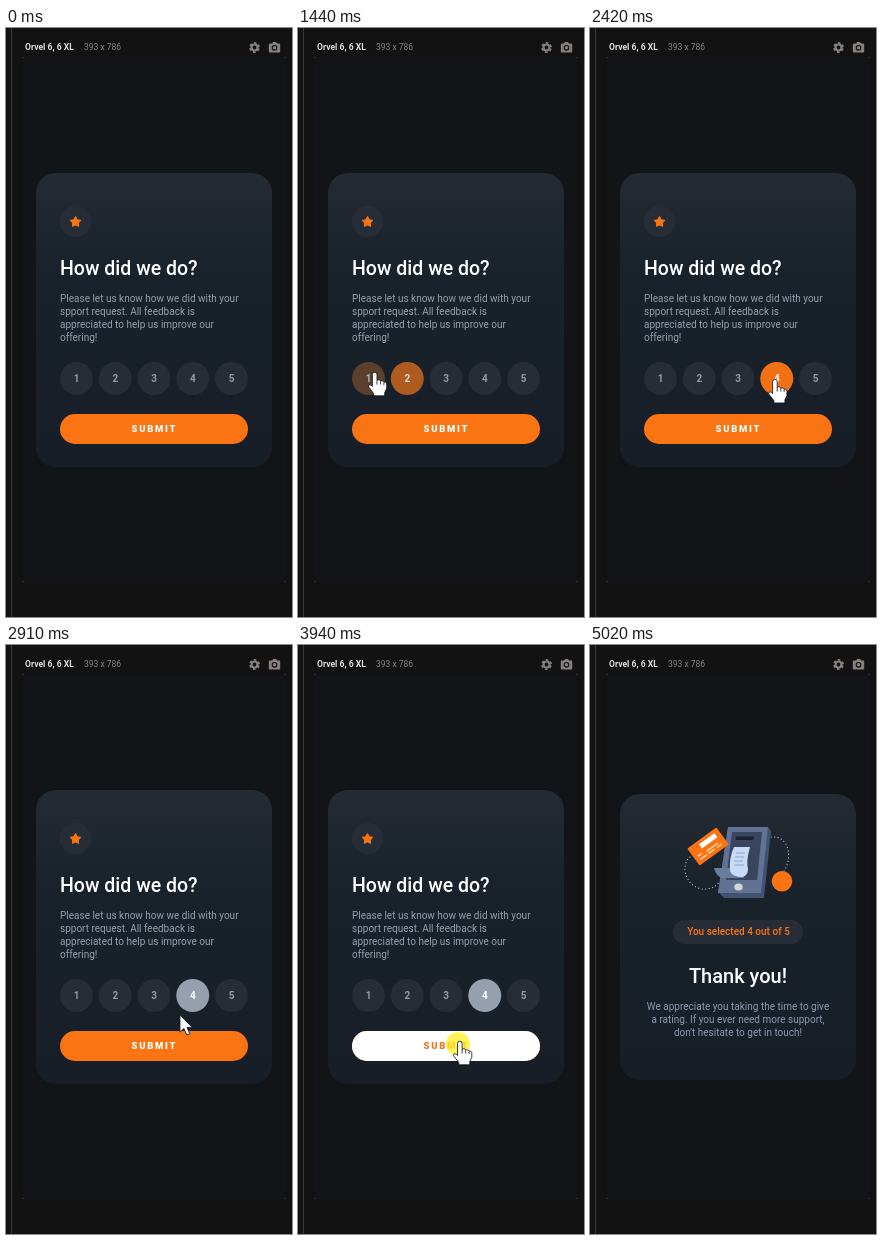
These frames come from a looping animation (286x589 px, 6080 ms). An HTML page:

```html
<!DOCTYPE html>
<html lang="en">
<head>
<meta charset="utf-8">
<title>Feedback form</title>
<style>
  html, body { margin: 0; width: 100%; height: 100%; overflow: hidden; background: #121212; }
  svg { display: block; width: 286px; height: 589px; font: 10px Roboto, sans-serif; }
  .title { font-weight: 500; fill: #fff; }
  .copy { fill: #969fad; }
  .mid { text-anchor: middle; }
  .submit { font-size: 9.5px; font-weight: 900; letter-spacing: 1.7px; }
  .num { font-weight: 700; }
  .dots { fill: none; stroke: #cfd6e2; stroke-width: 1.1; stroke-dasharray: .1 3.4; stroke-linecap: round; }
</style>
</head>
<body>
<svg viewBox="0 0 286 589">
  <defs>
    <linearGradient id="shade" x2="0" y2="1">
      <stop stop-color="#242b34"/>
      <stop offset=".35" stop-color="#19212b"/>
      <stop offset="1" stop-color="#171e28"/>
    </linearGradient>
  </defs>

  <!-- Preview frame -->
  <path d="M5.5 0V589" stroke="#383838"/>
  <rect x="17" y="30" width="262" height="524" fill="#121417"/>
  <path d="M16 29.5h2M278 29.5h2M16 553.5h2M278 553.5h2" stroke="#2c2c2c"/>
  <text x="19" y="22" font-size="8.6" font-weight="700" fill="#dedede">Orvel 6, 6 XL</text>
  <text x="78" y="22" font-size="8.5" fill="#858585">393 x 786</text>
  <g fill="none" stroke="#85807c">
    <circle cx="248.5" cy="19.5" r="3" stroke-width="2.2"/>
    <circle cx="248.5" cy="19.5" r="4.6" stroke-width="1.6" stroke-dasharray="2.6 2.217" stroke-dashoffset="3.7"/>
  </g>
  <path d="M264 15.5h2l1.2-1.5h2.8l1.2 1.5h2q1 0 1 1v7q0 1-1 1h-9.4q-1 0-1-1v-7q0-1 1-1z" fill="#85807c"/>
  <circle cx="268.5" cy="19.8" r="2.3" fill="#85807c" stroke="#121212" stroke-width="1.1"/>

  <g id="form">
    <rect x="30" y="145" width="236" height="294" rx="20" fill="url(#shade)"/>
    <circle cx="69.5" cy="193.5" r="15.7" fill="#262d36"/>
    <path id="star" fill="#fb7413" stroke="#fb7413" stroke-width="1.2" stroke-linejoin="round"/>
    <text class="title" x="54" y="247" font-size="19.5">How did we do?</text>
    <g class="copy">
      <text x="54" y="274">Please let us know how we did with your</text>
      <text x="54" y="287">spport request. All feedback is</text>
      <text x="54" y="300">appreciated to help us improve our</text>
      <text x="54" y="313">offering!</text>
    </g>
    <g id="ratings"></g>
    <rect x="54" y="386" width="188" height="30" rx="15" fill="#fb7413"/>
    <rect id="white" x="54" y="386" width="188" height="30" rx="15" fill="#fff"/>
    <text id="submit" class="submit" x="125.6" y="404.2">SUBMIT</text>
  </g>

  <g id="thanks">
    <rect x="30" y="149" width="236" height="286" rx="20" fill="url(#shade)"/>
    <path class="dots" d="M100 212C90 220 95 241 112 244Q124 245 130 236M181 192C199 190 203 213 194 226"/>
    <path d="M138 182H178L181 186 174 253H134L128 247z" fill="#435171"/>
    <path d="M138 182H178L171 248H128z" fill="#617294"/>
    <path d="M142 187H172L167 235H136z" fill="#38455c"/>
    <path d="M146 191.5H164L163.5 195H145.6z" fill="#1b2330"/>
    <path d="M124 223H149Q150 231 155 233H132Q126 231 124 223z" fill="#6b7d9f"/>
    <path d="M144 202H160Q156 216 158 224 158 230 153 232 142 232 140 226 139 212 144 202z" fill="#c8daf4"/>
    <path d="M146 208h9M145 212h9M144 216h9M144 220h10" stroke="#8da6cc"/>
    <ellipse cx="148.5" cy="242" rx="4.2" ry="3.5" fill="#d4d8d2"/>
    <g transform="translate(118 201.5) rotate(-36)">
      <rect x="-18" y="-10.5" width="36" height="21" rx="1" fill="#fb7413"/>
      <path d="M-6-4.5H13" stroke="#fff" stroke-width="5"/>
      <path d="M-14 2h5M-14 6h8M-4 6h8M7 6h5M-4 3h14" stroke="#ffd2ad" stroke-width="1.5"/>
    </g>
    <circle cx="192" cy="236.3" r="10.3" fill="#fb7413"/>
    <rect x="83" y="275" width="130" height="24" rx="12" fill="#262d37"/>
    <g class="mid">
      <text x="148.5" y="289.5" font-weight="500" fill="#fb7413">You selected 4 out of 5</text>
      <text class="title" x="148" y="338" font-size="20">Thank you!</text>
      <g fill="#8c99b1">
        <text x="148" y="365">We appreciate you taking the time to give</text>
        <text x="148" y="378">a rating. If you ever need more support,</text>
        <text x="148" y="391">don't hesitate to get in touch!</text>
      </g>
    </g>
  </g>

  <g id="cursor">
    <circle id="press" cy="1" r="12" fill="#fff02a" fill-opacity=".78"/>
    <path id="arrow" d="M0 0V17l4-3.6 2.8 6.6 3-1.3-2.8-6.4h5.3z" fill="#fff" stroke="#111" stroke-width=".8"/>
    <g id="hand" stroke="#111" stroke-width=".8" transform="translate(1.8 -1.5)">
      <path d="M-2.3 2a2.3 2.3 0 0 1 4.6 0V8a2 2 0 0 1 3.6.8 2 2 0 0 1 3.3 1 1.8 1.8 0 0 1 2.8 1.6V16l-2 4v3.3H-1V21L-6 14.5c-1-1.8 1-3 2.4-1.8L-2.3 14z" fill="#fff"/>
      <path d="M2.3 8v4M5.9 9v3M9.2 10v2.5" fill="none"/>
    </g>
  </g>
</svg>
<script>
const $ = id => document.getElementById(id);
const LOOP = 6080, FADE = 200, ORANGE = '#fb7413';
const SELECT = 2600, SWAP = 4070;

// Pointer tip: time, x, y
const path = [
  [260, 266, 526], [540, 208, 347], [680, 196, 298], [820, 160, 318], [890, 136, 342],
  [1100, 112, 346], [1370, 92, 347], [1440, 75, 346], [1510, 67, 348], [1560, 82, 353],
  [1700, 109, 356], [1790, 127, 356], [2000, 158, 355], [2100, 159, 355], [2250, 172, 354],
  [2450, 185, 353], [2700, 184, 353], [2910, 174, 370], [3120, 168, 386], [3480, 160, 398],
  [4540, 160, 398], [4750, 230, 584]
];
// Hover spans of each rating: enter, leave
const hovers = [
  [[1390, 1560]],
  [[1100, 1370], [1600, 1790]],
  [[840, 1060], [1840, 2140]],
  [[2230, 2700]],
  []
];

const clamp = v => Math.max(0, Math.min(1, v));
const between = (t, a, b) => t >= a && t < b;
const show = (id, on) => $(id).style.display = on ? '' : 'none';
const blend = (a, b, k) => `color-mix(in srgb, ${b} ${k * 100}%, ${a})`;
const fade = (t, [enter, leave]) => clamp((t - enter) / FADE) * (1 - clamp((t - leave) / FADE));

function pointer(t) {
  const i = path.findIndex(p => p[0] > t);
  if (i < 1) return path.at(i).slice(1);
  const [a, b] = [path[i - 1], path[i]], k = (t - a[0]) / (b[0] - a[0]);
  return [1, 2].map(n => a[n] + (b[n] - a[n]) * k);
}

$('star').setAttribute('d', 'M' + Array.from({ length: 10 }, (_, i) => {
  const r = i % 2 ? 2.8 : 5.2, a = i * Math.PI / 5;
  return `${69.5 + r * Math.sin(a)} ${194 - r * Math.cos(a)}`;
}).join('L') + 'z');

$('ratings').innerHTML = hovers.map((_, i) => {
  const x = 70.5 + 38.75 * i, disc = `<circle cx="${x}" cy="350.5" r="16.5"`;
  return `<g>${disc}/>${disc} fill="${ORANGE}"/><text class="num mid" x="${x}" y="353.5">${i + 1}</text></g>`;
}).join('');

function draw(t) {
  show('form', t < SWAP);
  show('thanks', t >= SWAP);

  hovers.forEach((spans, i) => {
    const [base, glow, label] = $('ratings').children[i].children;
    const level = Math.max(0, ...spans.map(s => fade(t, s)));
    const chosen = i === 3 && t >= SELECT;
    base.style.fill = chosen ? '#969fad' : '#262d36';
    glow.style.opacity = level;
    label.style.fill = blend('#929aa6', '#fff', chosen ? 1 : level);
  });

  const hot = clamp((t - 3120) / FADE);
  $('white').style.opacity = hot;
  $('submit').style.fill = blend('#fff', '#e9731f', hot);

  const hand = between(t, 850, 2750) || between(t, 3120, SWAP);
  show('cursor', between(t, 260, 5020));
  show('hand', hand);
  show('arrow', !hand);
  show('press', between(t, SELECT, 2700) || between(t, 3940, SWAP));
  $('cursor').setAttribute('transform', `translate(${pointer(t)})`);
}

function tick() {
  draw(performance.now() % LOOP);
  requestAnimationFrame(tick);
}
tick();
</script>
</body>
</html>
```
